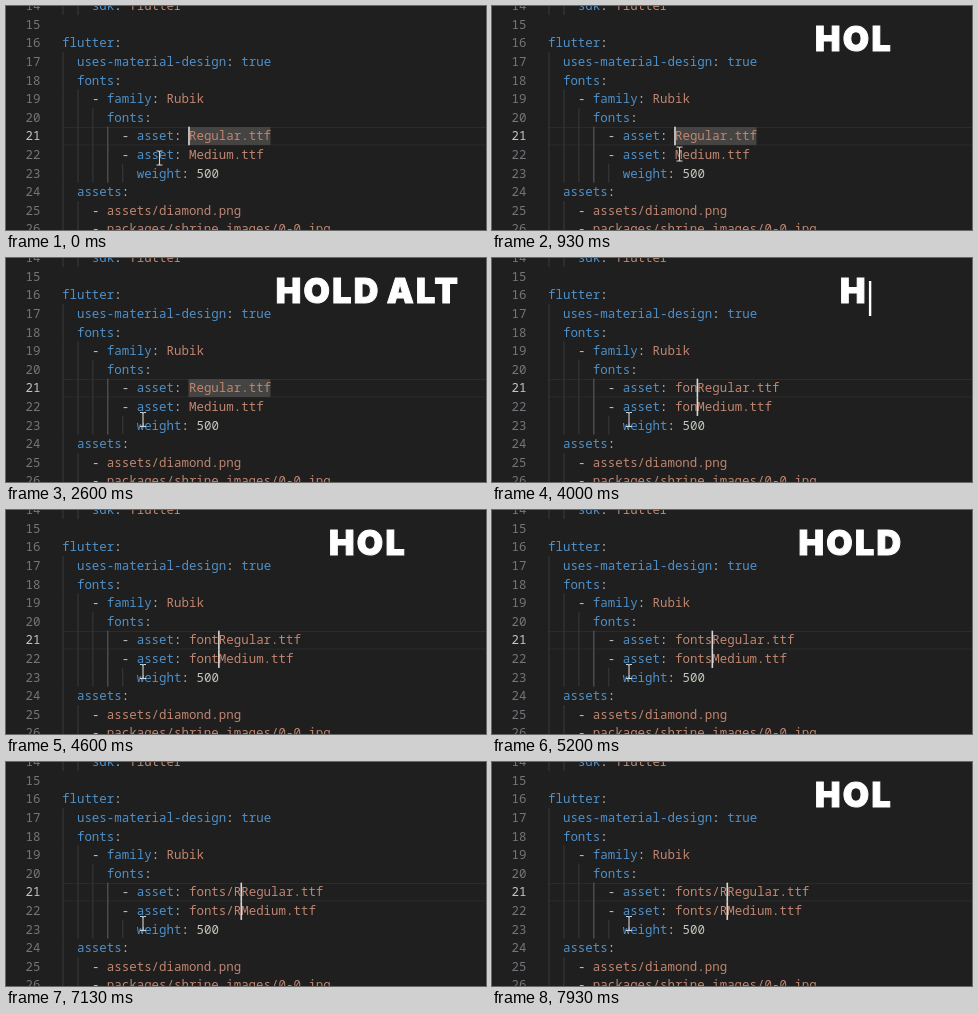
An HTML page that plays this animation: 480 by 224 pixels, repeating every 8 s.

```html
<!DOCTYPE html>
<html lang="en">
<head>
<meta charset="utf-8">
<title>Multi-cursor tip</title>
<style>
  html, body { margin: 0; width: 100%; height: 100%; overflow: hidden; background: #1f1f1f; }
  svg { display: block; width: 480px; height: 224px; }
  text { white-space: pre; }
  .code { font: 500 12.45px "Noto Sans Mono", "DejaVu Sans Mono", monospace; }
  .title {
    font: 900 34px Inter, Roboto, sans-serif; letter-spacing: 2.3px; word-spacing: -3px;
    fill: #fff; stroke: #fff; stroke-width: 1px; text-anchor: middle;
  }
</style>
</head>
<body>
<svg id="stage" viewBox="0 0 480 224" xmlns="http://www.w3.org/2000/svg">
  <rect width="480" height="224" fill="#1f1f1f"/>
</svg>
<script>
const LOOP = 8000, CHAR = 7.47, LEFT = 56, ROW = 18.6;
const stage = document.getElementById("stage");
const KEY = "#4f90c8", STR = "#c08670", PUNCT = "#c4c4c4", NUM = "#c3cabc";

// line number: [indent, [text, colour], ...]
const lines = {
  14: [4, ["sdk", KEY], [": ", PUNCT], ["flutter", STR]],
  15: [0],
  16: [0, ["flutter", KEY], [":", PUNCT]],
  17: [2, ["uses-material-design", KEY], [": ", PUNCT], ["true", KEY]],
  18: [2, ["fonts", KEY], [":", PUNCT]],
  19: [4, ["- ", PUNCT], ["family", KEY], [": ", PUNCT], ["Rubik", STR]],
  20: [6, ["fonts", KEY], [":", PUNCT]],
  21: [8, ["- ", PUNCT], ["asset", KEY], [": ", PUNCT], ["Regular.ttf", STR]],
  22: [8, ["- ", PUNCT], ["asset", KEY], [": ", PUNCT], ["Medium.ttf", STR]],
  23: [10, ["weight", KEY], [": ", PUNCT], ["500", NUM]],
  24: [2, ["assets", KEY], [":", PUNCT]],
  25: [4, ["- ", PUNCT], ["assets/diamond.png", STR]],
  26: [4, ["- ", PUNCT], ["packages/shrine_images/0-0.jpg", STR]]
};

function add(tag, attrs, str) {
  const el = document.createElementNS("http://www.w3.org/2000/svg", tag);
  for (const k in attrs) el.setAttribute(k, attrs[k]);
  if (str) el.textContent = str;
  return stage.appendChild(el);
}
const mid = n => 37 + ROW * (n - 16);
const colX = c => LEFT + CHAR * c;
const show = (el, on) => el.setAttribute("visibility", on ? "visible" : "hidden");

for (const y of [121, 138.5]) add("rect", { x: LEFT, y, width: 424, height: 1, fill: "#2b2b2b" });
const mark = add("rect", { x: 182.5, y: 121, width: 82, height: 18, fill: "#454443" });

const names = {};
for (const key in lines) {
  const n = +key, [indent, ...parts] = lines[n], y = mid(n) + 4.3;
  for (let c = 0; c < indent; c += 2) {
    const active = c === 6 && n > 20 && n < 24;
    add("rect", { x: colX(c) + .5, y: mid(n) - ROW / 2, width: 1, height: ROW, fill: active ? "#626262" : "#3b3b3b" });
  }
  add("text", { class: "code", x: 34.5, y, "text-anchor": "end", fill: n === 21 ? "#c6c6c6" : "#737579" }, key);
  let c = indent;
  for (const [str, fill] of parts) {
    names[n] = add("text", { class: "code", x: colX(c), y, fill }, str);
    c += str.length;
  }
}

const carets = [21, 22].map(n =>
  add("rect", { y: mid(n) - ROW / 2, width: 1.6, height: ROW, fill: "#d8d8d8" }));
const mouse = add("path", {
  d: "M-3-7H-1.2Q0-7 0-6Q0-7 1.2-7H3M0-6V6M-3 7H-1.2Q0 7 0 6Q0 7 1.2 7H3",
  fill: "none", stroke: "#d4d4d4", "stroke-width": 1.1
});
const title = add("text", { class: "title", x: 362, y: 44.5 });
const bar = add("rect", { y: 23, width: 2.4, height: 35, fill: "#fff" });

const CLICK = 1050;
const typed = [[3450, "f"], [3700, "o"], [3900, "n"], [4400, "t"], [4800, "s"], [5700, "/"], [6890, "R"]];
const path = [[0, 153.5, 152], [250, 153.5, 152], [800, 187.5, 148], [1150, 187.5, 148], [1850, 137, 161.5], [LOOP, 137, 161.5]];

function drawCode(t) {
  const done = typed.filter(k => k[0] <= t);
  const prefix = done.map(k => k[1]).join("");
  names[21].textContent = prefix + "Regular.ttf";
  names[22].textContent = prefix + "Medium.ttf";
  show(mark, !prefix);

  // blinking restarts after every click or key
  const last = done.length ? done[done.length - 1][0] : t < CLICK ? -100 : CLICK;
  const on = (t - last) % 1000 < 500;
  carets.forEach((el, i) => {
    el.setAttribute("x", colX(17 + prefix.length) - .8);
    show(el, on && (i === 0 || t >= CLICK));
  });
}

function drawMouse(t) {
  const i = path.findIndex(p => p[0] > t);
  const a = path[i - 1], b = path[i];
  const u = (t - a[0]) / (b[0] - a[0]), e = u * u * (3 - 2 * u);
  mouse.setAttribute("transform", `translate(${a[1] + (b[1] - a[1]) * e} ${a[2] + (b[2] - a[2]) * e})`);
}

function drawTitle(t) {
  const p = t % 3490;
  const str = p < 3370 ? "HOLD ALT".slice(0, Math.floor(p / 293.3)) : "";
  title.textContent = str;
  const w = str ? title.getComputedTextLength() : 0;
  bar.setAttribute("x", 362 + w / 2 + 1);
  show(bar, str && p % 840 >= 420);
}

function draw(t) {
  drawCode(t);
  drawMouse(t);
  drawTitle(t);
}

let start;
function frame(now) {
  start ??= now;
  draw((now - start) % LOOP);
  requestAnimationFrame(frame);
}
draw(0);
requestAnimationFrame(frame);
</script>
</body>
</html>
```
